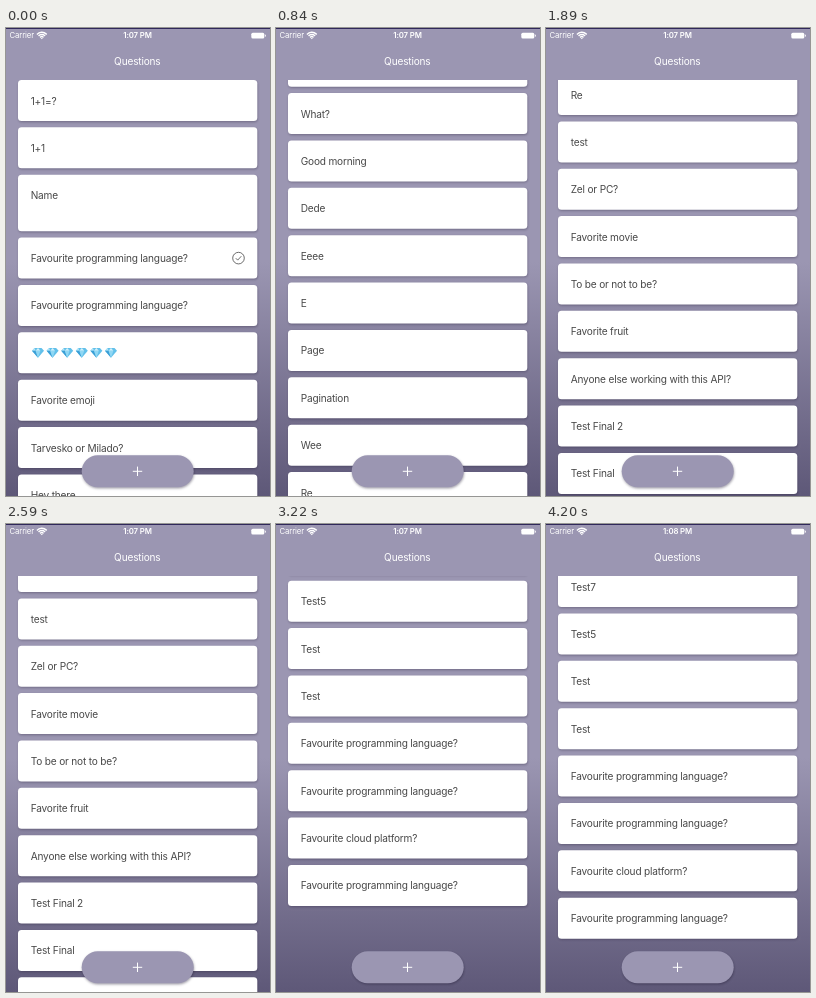
These frames come from a looping animation (264x468 px, 4690 ms). An HTML page with a canvas:

```html
<!DOCTYPE html>
<html lang="en">
<head>
<meta charset="utf-8">
<title>Questions</title>
<style>
  html, body { margin: 0; width: 100%; height: 100%; overflow: hidden; background: #9b96b2; }
  canvas { display: block; width: 264px; height: 468px; }
</style>
</head>
<body>
<canvas id="stage"></canvas>
<script>
const W = 264, H = 468, LOOP = 4690, STEP = 70;
const LILAC = '#9b96b2', DUSK = '#5e5878', INK = '#484848';
const LIST_TOP = 52, PITCH = 47.37, CARD_H = 41, TALL_EXTRA = 15.5, TALL = 2;
const PAGE = 30, LOADED = 1750, CLOCK_TICK = 3430;

const FAVOURITE = 'Favourite programming language?';
const titles = [
  '1+1=?', '1+1', 'Name', FAVOURITE, FAVOURITE, '', 'Favorite emoji',
  'Tarvesko or Milado?', 'Hey there', 'Hello', 'Tea or coffee?', 'Cats or dogs?',
  'Test question', 'How are you?', 'Why?', 'What?', 'Good morning', 'Dede', 'Eeee',
  'E', 'Page', 'Pagination', 'Wee', 'Re', 'test', 'Zel or PC?', 'Favorite movie',
  'To be or not to be?', 'Favorite fruit', 'Anyone else working with this API?',
  'Test Final 2', 'Test Final', 'Test9', 'Test8', 'Test7', 'Test5', 'Test', 'Test',
  FAVOURITE, FAVOURITE, 'Favourite cloud platform?', FAVOURITE
];
const CHECKED = 3, GEMS = 5;

// Scroll offset over time: two flicks, each ending in a rubber-band bounce.
const scrollKeys = [
  [0, 0], [420, 0], [560, 70], [630, 170], [700, 330], [840, 713], [910, 900],
  [980, 1078], [1050, 1134], [1120, 1140], [1190, 1133], [1400, 1105], [1470, 1105],
  [1680, 1111], [2520, 1111], [2590, 1130], [2660, 1215], [2800, 1555],
  [2870, 1647.4], [2940, 1682], [3010, 1692], [3080, 1690], [3220, 1668.7],
  [3360, 1651], [3500, 1642], [3640, 1638], [3780, 1636], [LOOP, 1636]
];

const canvas = document.getElementById('stage');
const ctx = canvas.getContext('2d');
const scale = Math.max(1, window.devicePixelRatio || 1);
canvas.width = W * scale;
canvas.height = H * scale;

const slope = i => (scrollKeys[i + 1][1] - scrollKeys[i][1]) / (scrollKeys[i + 1][0] - scrollKeys[i][0]);

function tangent(i) {
  if (i === 0 || i === scrollKeys.length - 1) return 0;
  const a = slope(i - 1), b = slope(i);
  return a * b <= 0 ? 0 : 2 * a * b / (a + b);
}

// Monotone cubic interpolation, so that holds stay flat.
function scrollAt(t) {
  let i = 0;
  while (i < scrollKeys.length - 2 && t >= scrollKeys[i + 1][0]) i++;
  const [t0, a] = scrollKeys[i], [t1, b] = scrollKeys[i + 1];
  const d = t1 - t0, u = (t - t0) / d, v = 1 - u;
  return a * v * v * (1 + 2 * u) + b * u * u * (3 - 2 * u)
    + d * u * v * (tangent(i) * v - tangent(i + 1) * u);
}

const cardTop = i => LIST_TOP + i * PITCH + (i > TALL ? TALL_EXTRA : 0);

function text(str, x, y, { size = 10.1, weight = 400, color = '#fff', align = 'left' } = {}) {
  ctx.font = `${weight} ${size}px Inter, "Liberation Sans", sans-serif`;
  ctx.letterSpacing = `${-size * 0.018}px`;
  ctx.textAlign = align;
  ctx.fillStyle = color;
  ctx.fillText(str, x, y);
}

function box(x, y, w, h, r, fill, shadow) {
  ctx.save();
  if (shadow) {
    ctx.shadowColor = `rgba(30, 24, 50, ${shadow})`;
    ctx.shadowBlur = 2.5 * scale;
    ctx.shadowOffsetX = 0.5 * scale;
    ctx.shadowOffsetY = 1.2 * scale;
  }
  ctx.fillStyle = fill;
  ctx.beginPath();
  ctx.roundRect(x, y, w, h, r);
  ctx.fill();
  ctx.restore();
}

function line(points, color, width) {
  ctx.strokeStyle = color;
  ctx.lineWidth = width;
  ctx.beginPath();
  points.forEach(([x, y]) => ctx.lineTo(x, y));
  ctx.stroke();
}

function polygon(points, fill) {
  ctx.fillStyle = fill;
  ctx.beginPath();
  points.forEach(([x, y]) => ctx.lineTo(x, y));
  ctx.fill();
}

function arc(x, y, r, from, to, color, width) {
  ctx.strokeStyle = color;
  ctx.lineWidth = width;
  ctx.beginPath();
  ctx.arc(x, y, r, from, to);
  ctx.stroke();
}

function gem(x, y) {
  ctx.save();
  ctx.translate(x, y);
  polygon([[-6, -2], [-3.5, -4.8], [3.5, -4.8], [6, -2], [0, 5]], '#62c0ea');
  polygon([[-6, -2], [-3.5, -4.8], [-2.4, -2]], '#b5e6f8');
  polygon([[-2.4, -2], [0, -4.8], [2.4, -2]], '#d3f1fb');
  polygon([[-6, -2], [-2.4, -2], [0, 5]], '#3b9fd6');
  polygon([[-2.4, -2], [2.4, -2], [0, 5]], '#8fd7f4');
  ctx.restore();
}

function checkmark(x, y) {
  arc(x, y, 5.8, 0, Math.PI * 2, INK, 0.8);
  line([[x - 2.7, y + 0.1], [x - 0.8, y + 2], [x + 2.8, y - 1.9]], INK, 0.8);
}

function spinner(x, y) {
  for (let i = 0; i < 12; i++) {
    const a = i * Math.PI / 6, c = Math.cos(a), s = Math.sin(a);
    line([[x + c * 3.3, y + s * 3.3], [x + c * 6.3, y + s * 6.3]],
      `rgba(255, 255, 255, ${0.3 + 0.6 * i / 11})`, 1.1);
  }
}

function drawCard(i, y) {
  box(12, y, 239.3, CARD_H + (i === TALL ? TALL_EXTRA : 0), 3.5, '#fff', 0.32);
  text(titles[i], 24.7, y + 24.5, { color: INK });
  if (i === CHECKED) checkmark(232.5, y + 20.5);
  if (i === GEMS) for (let k = 0; k < 6; k++) gem(32 + k * 14.6, y + 20.5);
}

function drawList(t) {
  const scroll = scrollAt(t);
  const reveal = Math.min(1, Math.max(0, (t - LOADED) / (2 * STEP)));
  ctx.save();
  ctx.beginPath();
  ctx.rect(0, LIST_TOP, W, H - LIST_TOP);
  ctx.clip();
  titles.forEach((_, i) => {
    const y = cardTop(i) - scroll;
    if (y < -20 || y > H) return;
    ctx.globalAlpha = i < PAGE ? 1 : reveal;
    if (ctx.globalAlpha > 0) drawCard(i, y);
  });
  ctx.globalAlpha = 1;
  if (reveal === 0) spinner(131.5, cardTop(PAGE - 1) - scroll + 53.5);
  ctx.restore();
}

function drawBackground() {
  const g = ctx.createLinearGradient(0, 0, 0, H);
  g.addColorStop(0, LILAC);
  g.addColorStop(0.5, LILAC);
  g.addColorStop(1, DUSK);
  ctx.fillStyle = g;
  ctx.fillRect(0, 0, W, H);
  ctx.fillStyle = '#30285a';
  ctx.fillRect(0, 0, W, 1);
}

function drawHeader(t) {
  text('Carrier', 3.5, 10.4, { size: 7.8 });
  [2.3, 4.5, 6.7].forEach(r => arc(35.8, 11, r, -Math.PI * 0.76, -Math.PI * 0.24, '#fff', 1.4));
  polygon([[35.8, 11.3], [34.7, 10], [36.9, 10]], '#fff');
  text(t < CLOCK_TICK ? '1:07 PM' : '1:08 PM', 131.5, 10.4, { size: 7.8, weight: 600, align: 'center' });
  box(245.3, 4.8, 13, 5.6, 1.5, '#fff');
  box(258.9, 6.5, 0.9, 2.2, 0.4, '#fff');
  text('Questions', 131.3, 36.8, { align: 'center' });
}

function drawButton() {
  box(75.7, 427.3, 112, 32, 16, LILAC, 0.4);
  line([[126.8, 443.3], [136.2, 443.3]], '#fff', 1);
  line([[131.5, 438.6], [131.5, 448]], '#fff', 1);
}

function render(now) {
  const t = Math.floor((now % LOOP) / STEP) * STEP;
  ctx.setTransform(scale, 0, 0, scale, 0, 0);
  drawBackground();
  drawList(t);
  drawHeader(t);
  drawButton();
}

let start = null;
function frame(now) {
  if (start === null) start = now;
  render(now - start);
  requestAnimationFrame(frame);
}
render(0);
requestAnimationFrame(frame);
</script>
</body>
</html>
```
